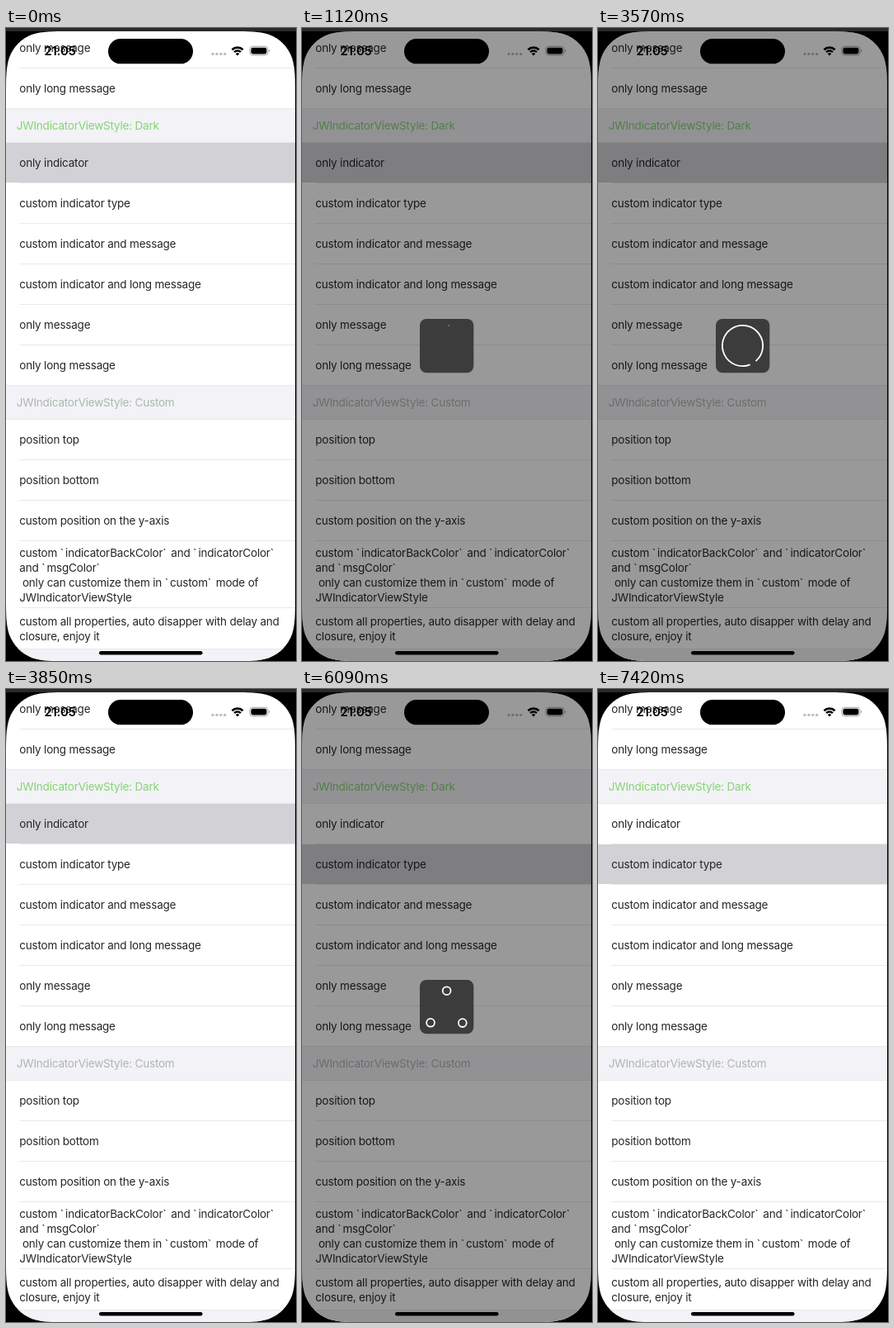
An HTML page for the animation above (8 s loop, 352 by 766 pixels).

```html
<!DOCTYPE html>
<html lang="en">
<head>
<meta charset="utf-8">
<title>Indicator styles</title>
<style>
  html, body { margin: 0; width: 352px; height: 766px; overflow: hidden; background: #000; }
  svg { display: block; }
  text { font: 400 13.5px Inter, "Liberation Sans", sans-serif; letter-spacing: -.2px; fill: #262628; white-space: pre; }
  .tick { letter-spacing: 2px; }
  .clock { font-size: 15px; font-weight: 600; letter-spacing: -.3px; fill: #000; }
  .line { stroke: #e9e9eb; }
  .band { fill: #f2f2f7; }
  .spin { fill: none; stroke: #fff; stroke-width: 1.8; }
</style>
</head>
<body>
<svg width="352" height="766" viewBox="0 0 352 766">
  <defs><clipPath id="screen"><path id="outline"/></clipPath></defs>
  <rect width="352" height="766"/>
  <rect width="352" height="4" fill="#2a2a2c"/>
  <g clip-path="url(#screen)">
    <rect y="4" width="351" height="762" fill="#fff"/>
    <rect id="mark" width="351" height="48" fill="#d1d1d6"/>
    <g id="list"></g>
    <text class="clock" x="46.5" y="33.3">21:05</text>
    <g fill="#bcbcbe" id="signal"></g>
    <g fill="none" stroke="#000" stroke-width="2.6">
      <path d="M274.4 26.3a9.4 9.4 0 0 1 13.2 0M277.1 29.1a5.5 5.5 0 0 1 7.8 0"/>
      <path d="M281 33.5l-2.2-2.3a3.1 3.1 0 0 1 4.4 0z" fill="#000" stroke="none"/>
    </g>
    <rect x="295.9" y="22.3" width="22" height="10.6" rx="3.4" fill="none" stroke="#a2a2a4"/>
    <rect x="297.4" y="23.8" width="19" height="7.6" rx="2.1"/>
    <path d="M319.2 25.8a2 2 0 0 1 0 3.6z" fill="#a2a2a4"/>
    <rect x="113" y="754" width="125.5" height="4.4" rx="2.2"/>
    <g id="overlay">
      <rect y="4" width="351" height="762" opacity=".4"/>
      <rect x="143" y="352" width="65.3" height="65.3" rx="8" fill="#3c3c3c"/>
      <g class="spin" transform="translate(175.5 384.5)">
        <path id="arc"/>
        <g id="rings"><circle r="4.9"/><circle r="4.9"/><circle r="4.9"/></g>
      </g>
    </g>
    <rect x="124" y="13" width="103" height="30.3" rx="15.1"/>
  </g>
</svg>
<script>
const $ = id => document.getElementById(id);
const LOOP = 8000, ROW = 49;
const SHOWS = [[1120, 3850], [4690, 7420]];
const RATE = 20 / 21;      // playback is slightly slower than real time
const R = 24.6, REACH = 19.6;

function add(parent, tag, attrs, label) {
  const el = document.createElementNS('http://www.w3.org/2000/svg', tag);
  for (const k in attrs) el.setAttribute(k, attrs[k]);
  if (label) el.textContent = label;
  return parent.appendChild(el);
}

// screen outline with continuous-curvature corners
function roundScreen(w, top, bottom, r) {
  const curve = [[1.53, 0], [1.09, 0], [.87, 0], [.63, .075], [.37, .17]];
  const corner = curve.concat(curve.map(([a, b]) => [b, a]).reverse());
  const side = (right, low) => {
    const pts = corner.map(([a, b]) =>
      `${right ? w - a * r : a * r} ${low ? bottom - b * r : top + b * r}`);
    return right === low ? pts.reverse() : pts;
  };
  const path = [[false, false], [true, false], [true, true], [false, true]]
    .map(([right, low]) => {
      const [p, ...rest] = side(right, low);
      return `L${p}C${rest.join(' ')}`;
    }).join('');
  return 'M' + path.slice(1) + 'Z';
}
$('outline').setAttribute('d', roundScreen(351, 4, 766, 51));

const list = $('list'), mark = $('mark');
function label(s, mid, x = 16.3, fill = '') {
  const el = add(list, 'text', { x, y: mid + 4.9, style: fill && `fill:${fill}` });
  s.split(/(`)/).forEach(part => add(el, 'tspan', part === '`' ? { class: 'tick' } : {}, part));
}
const rule = (y, x = 16) => add(list, 'path', { class: 'line', d: `M${x} ${y}H351` });
const band = (y, h) => {
  add(list, 'rect', { class: 'band', y, width: 351, height: h });
  rule(y + .5, 0);
};
function header(y, name, fill) {
  band(y, 41);
  rule(y + 41.5, 0);
  label('JWIndicatorViewStyle: ' + name, y + 21, 12.8, fill);
}
function rows(y, names) {
  names.forEach((s, i) => {
    label(s, y + ROW * i + 24.5);
    if (i) rule(y + ROW * i - .5);
  });
}
const lines = (y, texts) => texts.forEach((s, i) => label(s, y + 18 * i));

rows(0, ['only message', 'only long message']);
header(97, 'Dark', '#83d66f');
rows(139, ['only indicator', 'custom indicator type', 'custom indicator and message',
  'custom indicator and long message', 'only message', 'only long message']);
header(432, 'Custom', '#acb8ac');
rows(474, ['position top', 'position bottom', 'custom position on the y-axis']);
rule(620.5);
lines(635, ['custom `indicatorBackColor` and `indicatorColor`', 'and `msgColor`',
  ' only can customize them in `custom` mode of', 'JWIndicatorViewStyle']);
rule(701.5);
lines(718, ['custom all properties, auto disapper with delay and', 'closure, enjoy it']);
band(751, 15);
for (let i = 0; i < 4; i++) add($('signal'), 'circle', { cx: 251 + 4.9 * i, cy: 31.4, r: 1.7 });

// cubic-bezier(x1, 0, x2, 1)
function ease(x1, x2, x) {
  x = Math.min(1, Math.max(0, x));
  let lo = 0, hi = 1;
  for (let i = 0; i < 24; i++) {
    const s = (lo + hi) / 2, q = 1 - s;
    if (3 * x1 * s * q * q + 3 * x2 * s * s * q + s ** 3 < x) lo = s; else hi = s;
  }
  return lo * lo * (3 - 2 * lo);
}

function drawArc(t) {
  t %= 1.7;
  const turn = t / 1.7;
  const a = turn + ease(.4, .2, (t - .5) / 1.2), b = turn + ease(.4, .2, t / .7);
  const pt = f => `${R * Math.sin(f * 2 * Math.PI)} ${-R * Math.cos(f * 2 * Math.PI)}`;
  const mid = (a + b) / 2;
  $('arc').setAttribute('d', `M${pt(a)}A${R} ${R} 0 0 1 ${pt(mid)}A${R} ${R} 0 0 1 ${pt(b)}`);
}

const corners = [[0, -REACH], [REACH, REACH], [-REACH, REACH]];
const keys = [0, .33, .66, 1];
function drawRings(t) {
  const p = t / 2 % 1, k = p < .33 ? 0 : p < .66 ? 1 : 2;
  const e = ease(.42, .58, (p - keys[k]) / (keys[k + 1] - keys[k]));
  [...$('rings').children].forEach((ring, i) => {
    const from = corners[(i + k) % 3], to = corners[(i + k + 1) % 3];
    ring.setAttribute('cx', from[0] + (to[0] - from[0]) * e);
    ring.setAttribute('cy', from[1] + (to[1] - from[1]) * e);
  });
}

function draw(ms) {
  const show = SHOWS.findIndex(([a, b]) => ms >= a && ms < b);
  mark.setAttribute('y', ms < SHOWS[1][0] ? 139 : 188);
  $('overlay').style.display = show < 0 ? 'none' : '';
  $('arc').style.display = show === 0 ? '' : 'none';
  $('rings').style.display = show === 1 ? '' : 'none';
  if (show < 0) return;
  const t = (ms - SHOWS[show][0]) * RATE / 1000 + .027;
  (show ? drawRings : drawArc)(t);
}

const start = performance.now();
function tick() {
  draw((performance.now() - start) % LOOP);
  requestAnimationFrame(tick);
}
draw(0);
tick();
</script>
</body>
</html>
```
